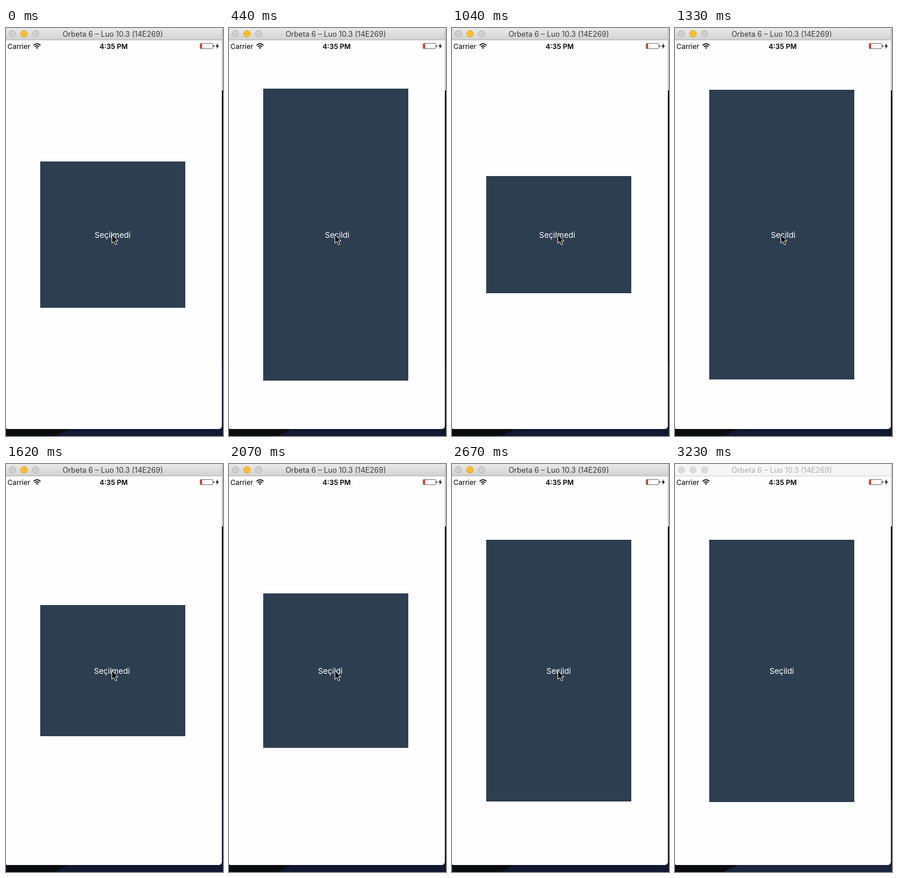
These frames come from a looping animation (374 by 700 pixels, 3330 ms). An HTML page:

```html
<!DOCTYPE html>
<html lang="tr">
<head>
<meta charset="utf-8">
<title>Spring box</title>
<style>
  html, body { margin: 0; width: 100%; height: 100%; overflow: hidden; background: #0b0c10; }
  svg { display: block; font-family: Inter, Roboto, sans-serif; }
  .light { fill: #cfcfcf; stroke: #b5b5b5; }
  .min { fill: #fdbd2c; stroke: #dfa023; }
  .title { fill: #3c3c3c; }
  .edge { fill: #b0b0b0; }
  .navy { fill: #12182f; }
  .idle .light, .idle .min { fill: #dcdcdc; stroke: #d0d0d0; }
  .idle .title { fill: #adadad; }
  .idle .bar { fill: #f6f6f6; }
  .idle .edge { fill: #d1d1d1; }
  .idle .navy { fill: #19243d; }
  .idle .cursor { display: none; }
</style>
</head>
<body>
<svg id="stage" width="374" height="700" viewBox="0 0 374 700">
  <defs>
    <linearGradient id="barFill" x2="0" y2="1">
      <stop stop-color="#e9e9e9"/><stop offset="1" stop-color="#d2d2d2"/>
    </linearGradient>
  </defs>

  <!-- desktop -->
  <rect width="374" height="700" fill="#0b0c10"/>
  <path class="navy" d="M84 700L110 687H374V700z"/>
  <rect class="navy" x="372" y="575" width="2" height="125"/>
  <rect x="372" width="2" height="107" fill="#d6d6d6"/>

  <!-- window -->
  <path d="M0 0H372V683a5 5 0 0 1-5 5H3a5 5 0 0 1-3-1z" fill="#fefefe"/>
  <path class="bar" d="M0 0H369a3 3 0 0 1 3 3V20H0z" fill="url(#barFill)"/>
  <rect class="edge" y="20" width="372" height="1"/>
  <rect class="edge" x="372" y="2" width="1" height="105"/>
  <circle class="light" cx="11" cy="10" r="5.6"/>
  <circle class="min" cx="31" cy="10" r="5.6"/>
  <circle class="light" cx="51" cy="10" r="5.6"/>
  <text class="title" x="184" y="14.8" font-size="12.7" text-anchor="middle">Orbeta 6 – Luo 10.3 (14E269)</text>

  <!-- status bar -->
  <text x="2.5" y="35.5" font-size="12">Carrier</text>
  <g fill="none" stroke="#000" stroke-width="1.7">
    <path d="M47.6 29.8a8 8 0 0 1 11.8 0M49.8 32.2a5 5 0 0 1 7.4 0"/>
    <path d="M53.5 35.8L51.6 33.8a2.8 2.8 0 0 1 3.8 0z" fill="#000" stroke="none"/>
  </g>
  <text x="185.5" y="35.5" font-size="12" font-weight="600" text-anchor="middle">4:35 PM</text>
  <rect x="334.5" y="26.5" width="22" height="9" rx="1.5" fill="none" stroke="#777"/>
  <rect x="335" y="27" width="3" height="8" fill="#f0372f"/>
  <path d="M357.5 29.5q1.6 0 1.6 1.5t-1.6 1.5z"/>
  <path d="M365.2 26L361.2 31.6H363.8L362.6 36L367 30.2H364.2z"/>

  <rect id="box" x="59" width="250" fill="#2d3e50"/>
  <text id="label" y="359.7" font-size="13.5" fill="#fff"></text>
  <path class="cursor" d="M182.5 354.5V369.3L185.9 366.2L188.4 371.9L191 370.8L188.5 365.2H193z"
        stroke="#fff" stroke-width="1"/>
</svg>

<script>
const $ = id => document.getElementById(id);
const LOOP = 3330, STEP = 148.3, MID = 354.6;
const SMALL = 250, GROW = 200;

const steps = [0, 150, 300, 440, 590, 740, 890, 1040, 1180, 1330, 1470,
  1620, 1770, 1920, 2070, 2220, 2370, 2520, 2670, 2820, 2970, 3230];

// Each tap toggles the box; the first one shrinks it.
const taps = [-590, 295, 872, 1186, 1514.5, 2057.7];

// Step response of an underdamped spring.
function spring(ms) {
  const zeta = 0.4, root = Math.sqrt(1 - zeta * zeta);
  const u = 0.022 * ms, a = root * u;
  return 1 - Math.exp(-zeta * u) * (Math.cos(a) + zeta / root * Math.sin(a));
}

function draw(t) {
  const step = steps.findLastIndex(s => s <= t);
  const now = step * STEP;
  let open = 1, selected = false;
  taps.forEach((tap, i) => {
    if (tap > now) return;
    selected = i % 2 === 1;
    open += (selected ? 1 : -1) * spring(now - tap);
  });

  const half = (SMALL + GROW * open) / 2;
  const top = Math.round(MID - half), bottom = Math.round(MID + half);
  $('box').setAttribute('y', top);
  $('box').setAttribute('height', bottom - top);
  $('label').setAttribute('x', 152.8 + 10 * open);
  $('label').textContent = selected ? 'Seçildi' : 'Seçilmedi';
  $('stage').classList.toggle('idle', step === steps.length - 1);
}

function tick() {
  draw(performance.now() % LOOP);
  requestAnimationFrame(tick);
}
tick();
</script>
</body>
</html>
```
